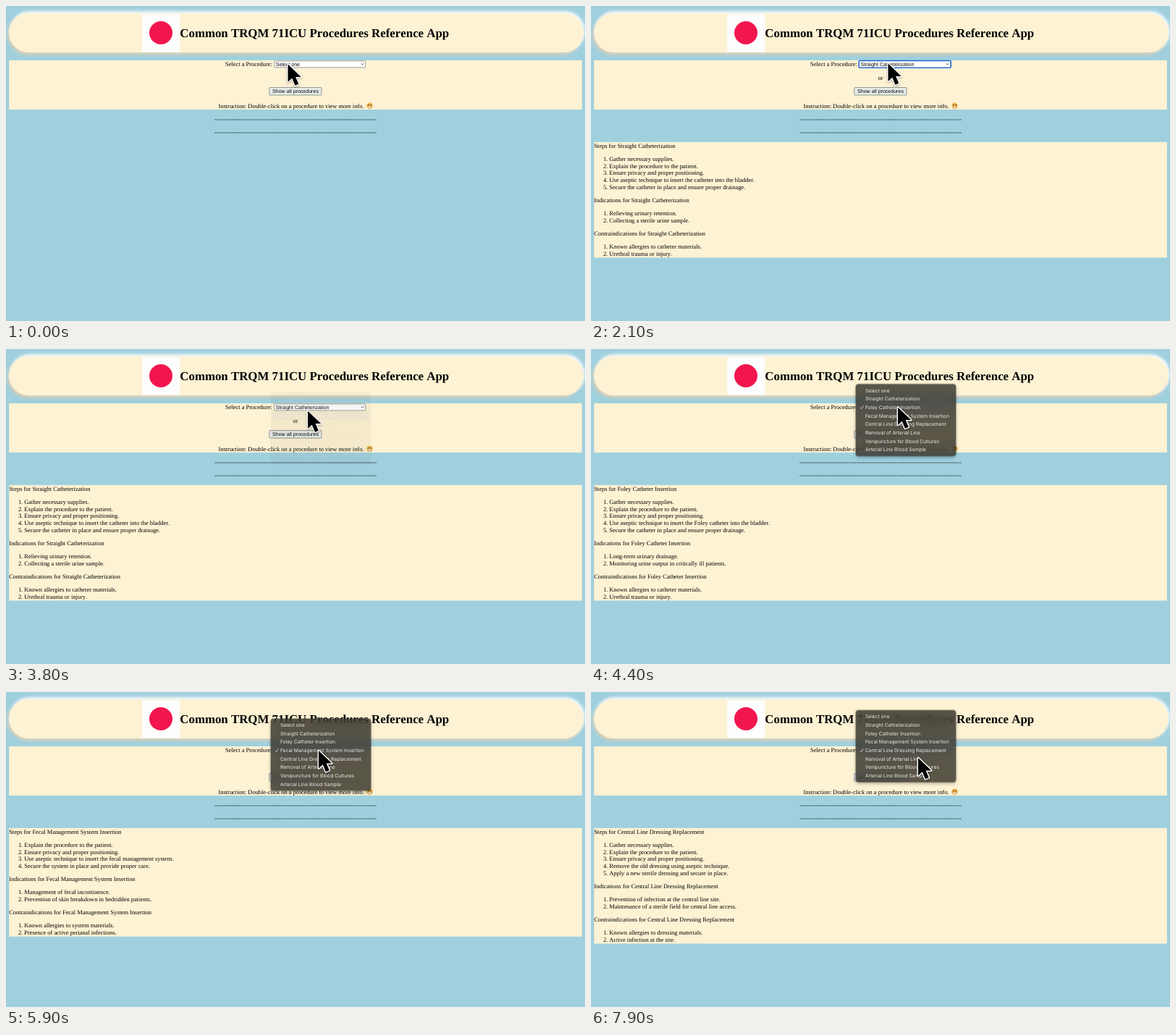
Write an HTML page that moves like this. It is 800x435 px and loops after 8 s.

```html
<!DOCTYPE html>
<html lang="en">
<head>
<meta charset="utf-8">
<title>Procedures Reference App</title>
<style>
  html, body { margin: 0; width: 100%; height: 100%; overflow: hidden; background: #a0d0de; }
  #page, #overlay { position: absolute; left: 0; top: 0; width: 800px; height: 435px; }
  text {
    font: 8.42px "Liberation Serif", "Times New Roman", serif; fill: #000;
    text-rendering: geometricPrecision; font-kerning: none; white-space: pre;
  }
  .mid { text-anchor: middle; }
  .title { font-size: 16.85px; font-weight: bold; }
  .ui { font: 7.05px "Liberation Sans", Arial, sans-serif; }
  .row { font: 6.76px Inter, "Open Sans", sans-serif; fill: #eceae4; }
  .card { fill: #fdf2d3; }
  .glow { filter: blur(2px); }
  #menu {
    position: absolute; left: 366px; top: 0; width: 138px; height: 98.6px; border-radius: 3.5px;
    background: rgba(33, 31, 27, .74); backdrop-filter: blur(10px) saturate(1.5);
    box-shadow: 0 0 0 .5px rgba(40, 40, 36, .6), 0 2px 5px rgba(0, 0, 0, .3);
  }
  #arrow { filter: drop-shadow(0 1px 1.2px rgba(0, 0, 0, .35)); }
</style>
</head>
<body>
<svg id="page" viewBox="0 0 800 435">
  <rect class="glow" x="2.5" y="12" width="793" height="55" rx="27" fill="#dccdb0"/>
  <rect class="glow" x="5.5" y="7.5" width="794" height="55" rx="27" fill="#fff"/>
  <rect class="card" x="4.2" y="10" width="793.6" height="54" rx="27"/>
  <rect x="188" y="11.3" width="52.3" height="52.3" fill="#fdfdfd"/>
  <circle cx="214" cy="37" r="16" fill="#f2164e"/>
  <text class="title" x="240.3" y="42.8">Common TRQM 71ICU Procedures Reference App</text>

  <rect class="card" x="4.2" y="75" width="791.6" height="68"/>
  <text x="303" y="82.9">Select a Procedure:</text>
  <rect id="ring" x="370.2" y="75.5" width="127" height="9.8" rx="1.6" fill="none" stroke="#1d66d0" stroke-width="1.6"/>
  <rect id="box" x="370.7" y="75.9" width="126" height="9" rx=".6" fill="#fff" stroke="#767676" stroke-width=".7"/>
  <text class="ui" id="value" x="372.7" y="82.7"></text>
  <path d="M490.9 79.4l1.7 1.7 1.7-1.7" fill="none" stroke="#222" stroke-width=".8"/>
  <text class="mid" x="400" y="101.6">or</text>
  <rect x="363.9" y="112.6" width="72" height="10.4" rx=".8" fill="#e9eeec" stroke="#747c7c" stroke-width=".8"/>
  <text class="ui mid" x="400" y="120.2">Show all procedures</text>
  <text x="293.5" y="140.7">Instruction: Double-click on a procedure to view more info.</text>
  <g transform="translate(502.5 137.8)">
    <circle r="4.2" fill="#f2b544"/>
    <path d="M-2.5 .7h5a2.5 2.5 0 0 1-5 0" fill="#fff" stroke="#8a5a2a" stroke-width=".4"/>
    <g fill="#5b3a20"><circle cx="-1.7" cy="-1.2" r=".8"/><circle cx="1.7" cy="-1.2" r=".8"/></g>
  </g>
  <text class="mid dashes" x="400" y="159.1"></text>
  <text class="mid dashes" x="400" y="177.2"></text>
  <g id="details"></g>
</svg>
<div id="menu"></div>
<svg id="overlay" viewBox="0 0 800 435">
  <g id="rows">
    <rect id="lit" x="368.4" width="133.2" height="11.67" rx="2.5" fill="#3f7aea"/>
    <path id="tick" d="M372 .4L373.5 2.2 376.4 -2.2" fill="none" stroke="#eceae4" stroke-width=".8"/>
  </g>
  <path id="arrow" d="M0-.5V25L6 19.5 10.3 29.9 15.4 27.8 11.1 17.7H19Z" stroke="#fff" stroke-width="3" stroke-linejoin="round" paint-order="stroke"/>
</svg>

<script>
const $ = id => document.getElementById(id);
const LOOP = 8000, STEP = 100, ROW = 11.67, MIDDLE = 80.5;

const names = ["Select one", "Straight Catheterization", "Foley Catheter Insertion",
  "Fecal Management System Insertion", "Central Line Dressing Replacement",
  "Removal of Arterial Line", "Venipuncture for Blood Cultures", "Arterial Line Blood Sample"];

const gather = "Gather necessary supplies.", explain = "Explain the procedure to the patient.",
  privacy = "Ensure privacy and proper positioning.",
  drain = "Secure the catheter in place and ensure proper drainage.",
  trauma = ["Known allergies to catheter materials.", "Urethral trauma or injury."];

// Steps, indications and contraindications of each procedure
const info = [null,
  [[gather, explain, privacy, "Use aseptic technique to insert the catheter into the bladder.", drain],
   ["Relieving urinary retention.", "Collecting a sterile urine sample."], trauma],
  [[gather, explain, privacy, "Use aseptic technique to insert the Foley catheter into the bladder.", drain],
   ["Long-term urinary drainage.", "Monitoring urine output in critically ill patients."], trauma],
  [[explain, privacy, "Use aseptic technique to insert the fecal management system.",
    "Secure the system in place and provide proper care."],
   ["Management of fecal incontinence.", "Prevention of skin breakdown in bedridden patients."],
   ["Known allergies to system materials.", "Presence of active perianal infections."]],
  [[gather, explain, privacy, "Remove the old dressing using aseptic technique.",
    "Apply a new sterile dressing and secure in place."],
   ["Prevention of infection at the central line site.", "Maintenance of a sterile field for central line access."],
   ["Known allergies to dressing materials.", "Active infection at the site."]]];

// Each visit to the menu; its index is the checked row, the row below gets picked
const visits = [
  { open: 300, lit: 700, fade: 1300, gone: 1500, set: 1800 },
  { open: 2800, lit: 3200, fade: 3600, gone: 3810, set: 4000 },
  { open: 4400, lit: 4700, fade: 4900, gone: 5100, set: 5300 },
  { open: 5800, lit: 6100, fade: 6300, gone: 6500, set: 6700 },
  { open: 7300, lit: LOOP, fade: LOOP, gone: LOOP + 200, set: LOOP }];

// Pointer tip: time, x, y
const path = [[0, 389.5, 81], [300, 389.5, 81], [1000, 402.5, 84], [1500, 408, 86], [1800, 408, 86],
  [2100, 410.5, 80], [2800, 411, 80.5], [3200, 415, 86], [3800, 417, 86], [4300, 424, 81],
  [4500, 424, 81], [4800, 429, 87], [5200, 429.5, 87.5], [5700, 432, 81.5], [5900, 432, 81.5],
  [6200, 436, 90], [6600, 436.5, 90.5], [7100, 444, 82], [7400, 445, 82], [7900, 452, 91.5], [8000, 452, 91.5]];

function svg(tag, attrs, text = "") {
  const el = document.createElementNS("http://www.w3.org/2000/svg", tag);
  for (const key in attrs) el.setAttribute(key, attrs[key]);
  el.textContent = text;
  return el;
}

const show = (el, on) => el.style.display = on ? "" : "none";

function buildDetails(lists, i) {
  const g = svg("g", {});
  if (!lists) return g;
  const card = svg("rect", { class: "card", x: 4.2, y: 187.9, width: 791.6 });
  g.append(card);
  let y = 195.7;
  const line = (x, text, gap) => g.append(svg("text", { x, y: y += gap }, text));
  lists.forEach((list, k) => {
    line(4.2, `${["Steps", "Indications", "Contraindications"][k]} for ${names[i]}`, k ? 18.16 : 0);
    list.forEach((text, n) => line(16.9, `${n + 1}. ${text}`, n ? 9.73 : 18.16));
  });
  card.setAttribute("height", y + 2.6 - 187.9);
  return g;
}

document.querySelectorAll(".dashes").forEach(el => el.textContent = "-".repeat(80));
const details = info.map(buildDetails);
$("details").append(...details);

// Rows are laid out from the middle of the first one
$("rows").append(...names.map((name, i) => svg("text", { class: "row", x: 378.9, y: i * ROW + 2.5 }, name)));

function tipAt(t) {
  const k = path.findIndex(p => p[0] > t);
  const [t0, x0, y0] = path[k - 1], [t1, x1, y1] = path[k];
  const f = (t - t0) / (t1 - t0);
  return [x0 + (x1 - x0) * f, y0 + (y1 - y0) * f];
}

function draw(t) {
  const picked = visits.filter(v => t >= v.set).length;
  const visit = visits[picked];
  const opened = t >= visit.open;
  const shown = opened && t < visit.gone;
  const focused = picked > 0 && !opened;

  details.forEach((g, i) => show(g, i === picked));
  $("value").textContent = names[picked];
  show($("ring"), focused);
  $("box").style.stroke = focused ? "#1d66d0" : "";

  show($("menu"), shown);
  show($("rows"), shown);
  if (shown) {
    const first = MIDDLE - picked * ROW;
    const opacity = Math.min(1, (visit.gone - t) / (visit.gone - visit.fade));
    $("menu").style.opacity = $("rows").style.opacity = opacity;
    $("menu").style.transform = `translateY(${first - 8.5}px)`;
    $("rows").setAttribute("transform", `translate(0 ${first})`);
    $("tick").setAttribute("transform", `translate(0 ${picked * ROW})`);
    $("lit").setAttribute("y", (picked + .5) * ROW);
    show($("lit"), t >= visit.lit);
  }
  $("arrow").setAttribute("transform", `translate(${tipAt(t)}) scale(.96)`);
}

const start = performance.now();
function loop() {
  const t = (performance.now() - start) % LOOP;
  draw(Math.floor(t / STEP) * STEP);
  requestAnimationFrame(loop);
}
loop();
</script>
</body>
</html>
```
